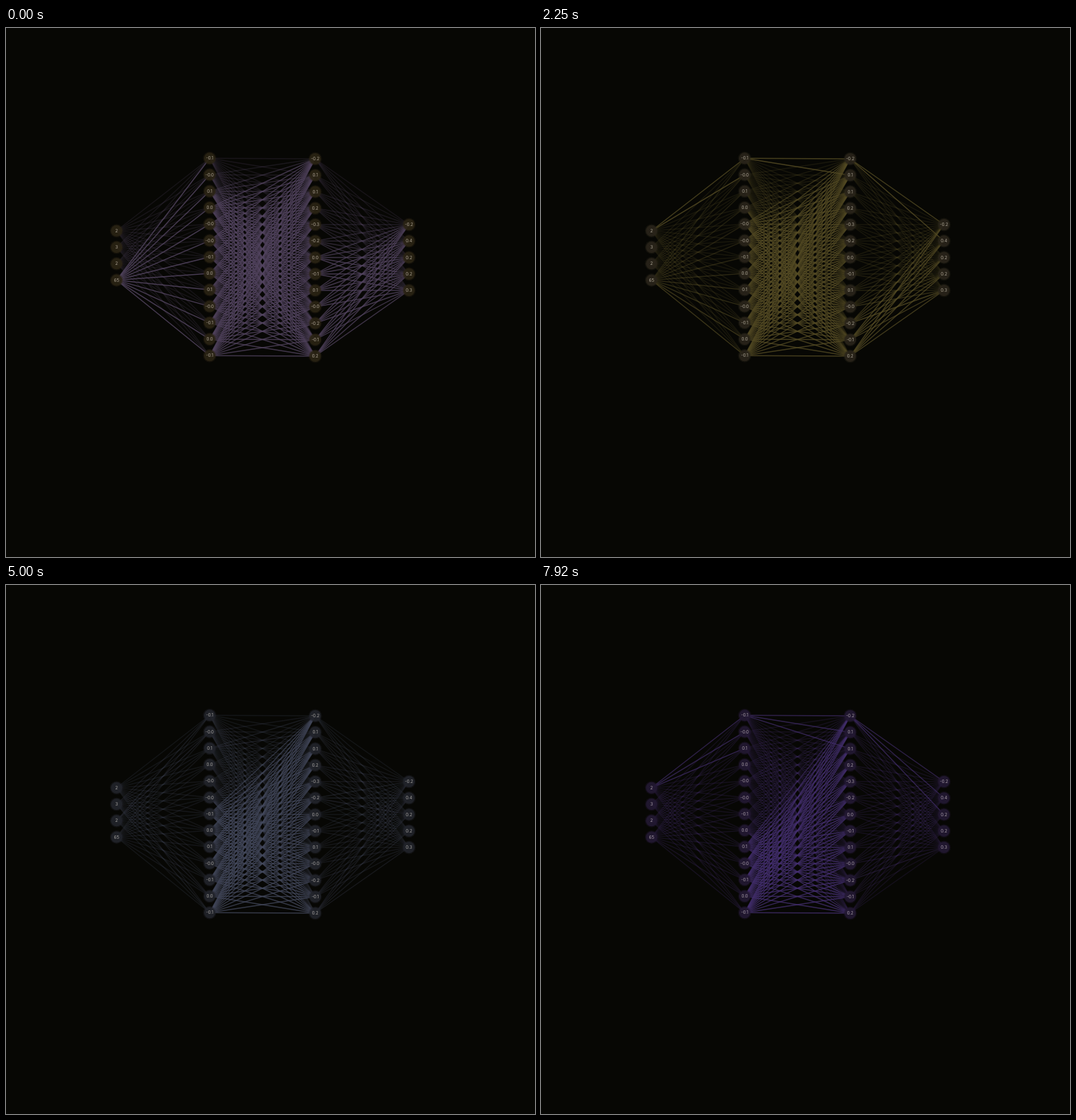
Write an HTML page with a canvas that moves like this. It is 748 px wide and 748 px high and loops after 8 s.

```html
<!DOCTYPE html>
<html lang="en">
<head>
<meta charset="utf-8">
<title>Network</title>
<style>
html, body { margin: 0; width: 100%; height: 100%; overflow: hidden; background: #070704; }
canvas { display: block; width: 100vmin; height: 100vmin; }
</style>
</head>
<body>
<canvas id="stage" width="748" height="748"></canvas>
<script>
const ctx = document.getElementById('stage').getContext('2d');
const SIZE = 748, LOOP = 8000, STEP = 1000 / 12;
const GAP = 23.25, RADIUS = 8;
const RATE = 9.4, START = 32.5, CYCLE = 52;
const BACK = [7, 7, 4];

const layers = [
  { x: 156.3, y: 286.8, labels: '2 3 2 65' },
  { x: 288, y: 184.3, labels: '-0.1 -0.0 0.1 0.0 -0.0 -0.0 -0.1 0.0 0.1 -0.0 -0.1 0.0 -0.1' },
  { x: 437.2, y: 185, labels: '-0.2 0.1 0.1 0.2 -0.3 -0.2 0.0 -0.1 0.1 -0.0 -0.2 -0.1 0.2' },
  { x: 569.8, y: 278, labels: '-0.2 0.4 0.2 0.2 0.3' }
].map(l => ({ ...l, labels: l.labels.split(' ') }));

const GOLD = [88, 71, 42];
const themes = [
  { at: -0.4, colour: [83, 69, 96] },
  { at: 1.6, colour: [86, 77, 36] },
  { at: 3.9, colour: [67, 72, 92] },
  { at: 5.9, colour: [69, 47, 112] }
];
const FADE = 0.4, NODE_DELAY = 0.4;

const mix = (a, b, p) => a.map((v, i) => v + (b[i] - v) * p);
const rgb = c => `rgb(${c.map(Math.round).join()})`;
const smooth = p => {
  p = Math.min(1, Math.max(0, p));
  return p * p * (3 - 2 * p);
};
const themeAt = t => themes.reduce(
  (c, { at, colour }) => mix(c, colour, smooth((t - at) / FADE)), GOLD);

// Edges stay lit until the sweep passes them, then fade; later sweeps flash at their start.
function edgeAlpha(k, head, lit) {
  const dim = 0.22;
  const age = Math.max(0, head - k) / RATE;
  let alpha = dim + (lit - dim) * Math.exp(-age / 0.8);
  for (let start = CYCLE; start < head; start += CYCLE) {
    const late = (head - start - k) / RATE;
    if (late >= 0) alpha += (0.12 + 0.7 * Math.exp(-k / 5)) * Math.exp(-late / 0.45);
  }
  return Math.min(1, alpha);
}

function drawEdges(colour, head) {
  ctx.strokeStyle = rgb(colour);
  ctx.lineWidth = 1.4;
  for (let n = 0; n < layers.length - 1; n++) {
    const a = layers[n], b = layers[n + 1];
    a.labels.forEach((label, i) => {
      // Small inputs light their edges only faintly.
      const lit = Math.abs(label) > 1 ? Math.min(0.85, 0.2 + label / 100) : 0.75;
      b.labels.forEach((_, j) => {
        ctx.globalAlpha = edgeAlpha(i * b.labels.length + j, head, lit);
        ctx.beginPath();
        ctx.moveTo(a.x, a.y + i * GAP);
        ctx.lineTo(b.x, b.y + j * GAP);
        ctx.stroke();
      });
    });
  }
  ctx.globalAlpha = 1;
}

function disc(x, y, r, alpha) {
  ctx.globalAlpha = alpha;
  ctx.beginPath();
  ctx.arc(x, y, r, 0, Math.PI * 2);
  ctx.fill();
  ctx.globalAlpha = 1;
}

function drawNodes(colour) {
  ctx.font = '6px Inter, Arial, sans-serif';
  ctx.textAlign = 'center';
  ctx.textBaseline = 'middle';
  const fill = rgb(mix(BACK, colour, 0.43));
  const ink = rgb(mix(colour, [200, 194, 182], 0.75));
  for (const { x, y, labels } of layers) {
    labels.forEach((label, i) => {
      const cy = y + i * GAP;
      ctx.fillStyle = fill;
      disc(x, cy, RADIUS + 1.5, 0.35);
      disc(x, cy, RADIUS, 0.9);
      ctx.fillStyle = ink;
      ctx.fillText(label, x, cy + 0.4);
    });
  }
}

function draw(now) {
  const t = Math.floor((now % LOOP + 5) / STEP) % 96 * STEP / 1000;
  ctx.fillStyle = rgb(BACK);
  ctx.fillRect(0, 0, SIZE, SIZE);
  drawEdges(themeAt(t), START + RATE * t);
  drawNodes(themeAt(t - NODE_DELAY));
}

const begin = performance.now();
function tick() {
  draw(performance.now() - begin);
  requestAnimationFrame(tick);
}
tick();
</script>
</body>
</html>
```
